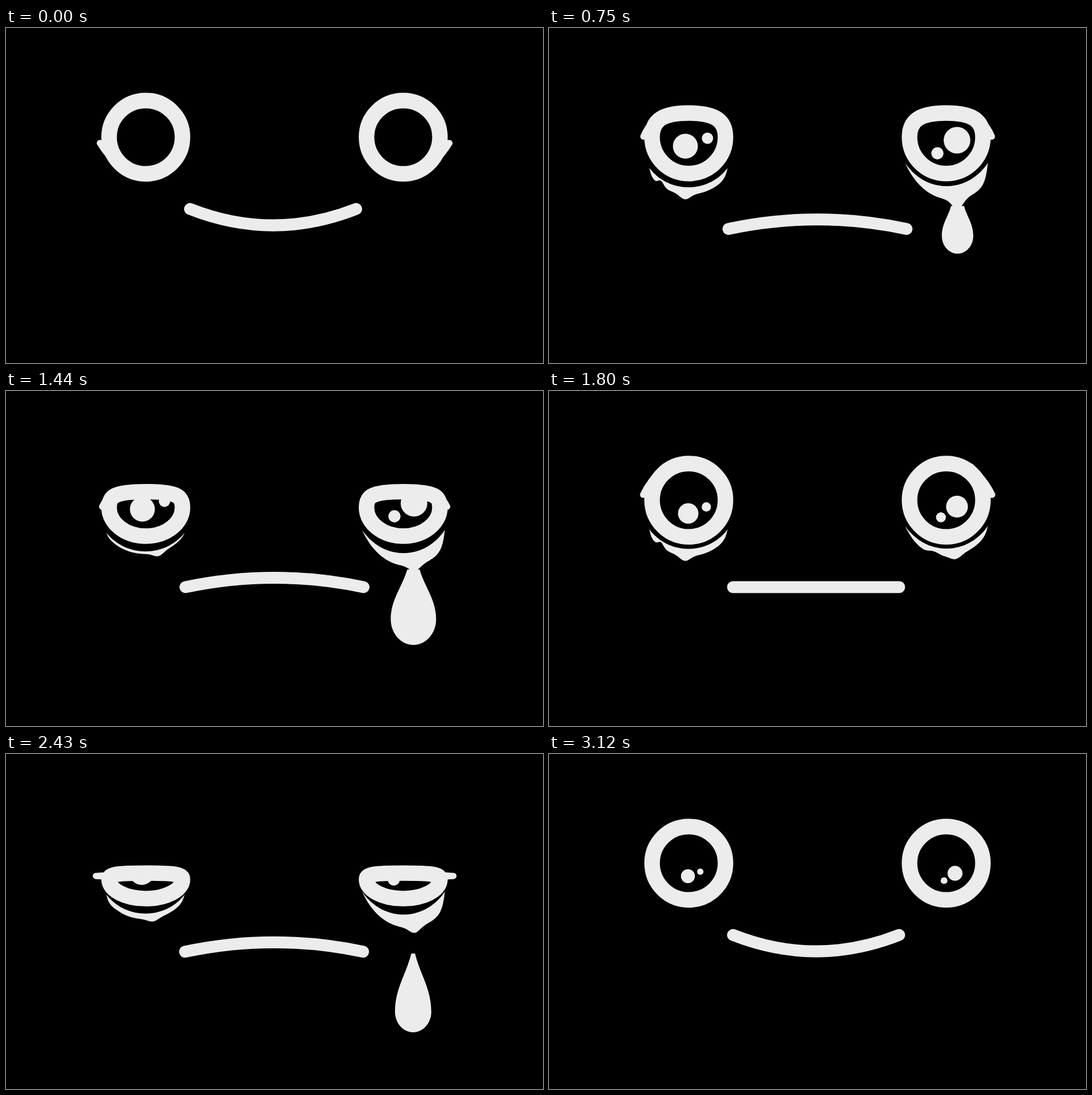
Write an HTML page that moves like this. It is 947 px wide and 591 px high and loops after 3390 ms.

```html
<!DOCTYPE html>
<html lang="en">
<head>
<meta charset="utf-8">
<title>Tearful face</title>
<style>
html, body { margin: 0; width: 100%; height: 100%; overflow: hidden; background: #000; }
svg { display: block; width: 100%; height: 100%; }
</style>
</head>
<body>
<svg viewBox="0 0 947 591" fill="#ececec">
  <defs>
    <clipPath id="clipL"><path id="holeL"/></clipPath>
    <clipPath id="clipR"><path id="holeR"/></clipPath>
  </defs>
  <path id="bagL"/><path id="bagR"/><path id="tear"/>
  <g stroke="#ececec" stroke-width="11" stroke-linejoin="round">
    <path id="browL"/><path id="browR"/>
  </g>
  <path id="fillL" fill="#000"/><path id="fillR" fill="#000"/>
  <g clip-path="url(#clipL)"><circle id="bigL"/><circle id="smallL"/></g>
  <g clip-path="url(#clipR)"><circle id="bigR"/><circle id="smallR"/></g>
  <g fill="none" stroke="#ececec" stroke-width="27.4">
    <path id="ringL"/><path id="ringR"/>
  </g>
  <path id="mouth" fill="none" stroke="#ececec" stroke-width="21" stroke-linecap="round"/>
</svg>
<script>
const LOOP = 3390, STEP = 30, MIRROR = 947.5;
const el = {};
document.querySelectorAll('[id]').forEach(n => el[n.id] = n);
const lerp = (a, b, u) => a + (b - a) * u;
const ease = u => u * u * (3 - 2 * u);
const bump = (u, at, width) => Math.exp(-(((u - at) / width) ** 2));

// Fixed traits of each eye: centre, bag ends and its tapers, glint radius and offset.
const sides = {
  L: { cx: 246.5, from: 177, to: 315, taper: [18, 14], notchAt: .17, notchWidth: .05, r: 22, glint: [39, -14] },
  R: { cx: 700.5, from: 628, to: 774, taper: [2.6, 14], notchAt: .36, notchWidth: .08, r: 23.5, glint: [-34.5, 23] }
};

// lid: 0 open to 1 shut          brow: tip, end
// look: size, big left, big right  mouth: left, right, y, bend
// bag: end y, lowest y of the upper edge, thickness left and right, drip, drip place, notch
// tear: x, neck y, half neck, half width, bottom
const neutral = {
  lid: [0],
  brow: [166, 183, 204, 133],
  look: [.82, 245.5, 216, 719.5, 204],
  mouth: [324.5, 617.5, 346, 346],
  bagL: [244, 278.5, 12, 13, 9, .46, 9],
  bagR: [238, 278, 15, 12, 7, .6, 6],
  tear: [718, 295, 7, 7, 297]
};
const sad = {
  ...neutral,
  look: [1, 237, 210, 716, 199],
  mouth: [314.5, 628, 354.5, 321],
  bagL: [244, 278.5, 20.5, 20, 2, .46, 2],
  bagR: [238, 278, 16, 30, 10, .62, 0],
  tear: [718, 504, 0, 0, 505]
};
const happy = {
  ...neutral,
  brow: [178, 185, 204, 140],
  look: [.56, 245, 215.5, 716, 210.5],
  mouth: [324.5, 617.5, 319.3, 377],
  bagL: [244, 278.5, 0, 0, 0, .46, 0],
  bagR: [238, 278, 0, 0, 0, .6, 0]
};
const smile = { ...happy, brow: [165.5, 203, 214, 257], look: [0, 246, 214, 712, 212] };
const welling = {
  ...neutral,
  lid: [.197],
  brow: [166.5, 191.5, 188, 160],
  look: [1, 240.5, 208.5, 719.5, 198],
  mouth: [316.5, 630.5, 354.5, 321],
  bagL: [247, 281, 12, 13, 9, .46, 9],
  bagR: [238, 279, 16, 30, 18, .62, 0],
  tear: [720.5, 314, 11.5, 27.7, 398]
};
const dripping = {
  ...welling,
  lid: [.443],
  brow: [169.5, 204, 187, 181],
  mouth: [316.5, 630.5, 346, 313],
  bagL: [250, 283, 5, 4, 7, .65, 0],
  bagR: [245, 286, 16, 28, 10, .62, 0],
  tear: [718.5, 315, 11, 40, 448]
};
const shut = { ...dripping, lid: [1], brow: [154.5, 227, 190, 240], tear: [718, 320, 5, 36, 484] };
const falling = { ...sad, lid: [.2], brow: welling.brow, tear: [718, 416, 0, 24, 505] };

const keys = [
  [0, smile], [330, smile], [600, neutral, ease],
  [750, welling], [810, dripping], [870, shut], [960, falling], [1050, sad],
  [1290, sad], [1440, dripping], [1530, shut], [1650, falling], [1800, neutral],
  [2130, neutral], [2280, welling], [2340, dripping], [2400, shut], [2490, falling], [2610, sad],
  [2940, sad], [3120, happy, ease], [LOOP, happy]
];

function poseAt(t) {
  const i = keys.findIndex(k => t < k[0]);
  const [t0, a] = keys[i - 1], [t1, b, curve] = keys[i];
  let u = (t - t0) / (t1 - t0);
  if (curve) u = curve(u);
  const pose = {};
  for (const name in a) pose[name] = a[name].map((v, j) => lerp(v, b[name][j], u));
  return pose;
}

// A circle whose top is pressed down by the lid.
function ringPath(cx, lid) {
  const l = cx - 64.7, r = cx + 64.7;
  const top = 128 + 112 * lid, low = 257.3 - 3 * lid;
  const mid = 192.6 + 54 * Math.max(0, lid - .2);
  const flat = 35.7 + 21 * Math.sin(Math.PI * lid);
  const up = 35.7 * (1 - lid), down = (low - mid) * .552;
  return `M${l},${mid}C${l},${mid - up} ${cx - flat},${top} ${cx},${top}` +
    `S${r},${mid - up} ${r},${mid}` +
    `C${r},${mid + down} ${cx + 35.7},${low} ${cx},${low}` +
    `S${l},${mid + down} ${l},${mid}Z`;
}

function browPath([x, y, ex, ey], mirror) {
  const m = v => mirror ? MIRROR - v : v;
  const bend = .15 * Math.abs(ey - y);
  return `M${m(x)},${y}Q${m((x + ex) / 2 - bend)},${(y + ey) / 2} ${m(ex)},${ey}L${m(x + 19)},${y + 1}Z`;
}

// Upper edge is an arc; the lower one hangs below it by a thickness with a drip and a notch.
function bagPath({ from, to, taper, notchAt, notchWidth }, [y, low, left, right, drip, dripAt, notch]) {
  const upper = [], lower = [], n = 64;
  for (let i = 0; i <= n; i++) {
    const u = i / n, side = 3 * u * (1 - u);
    const x = lerp(from, to, side * (.25 + .5 * u) + u ** 3);
    const arc = y + (low - y) * 4 * u * (1 - u);
    const edge = 1 - Math.abs(2 * u - 1) ** taper[u < .5 ? 0 : 1];
    const thick = lerp(left, right, ease(u)) + drip * bump(u, dripAt, .08) -
      notch * bump(u, notchAt, notchWidth);
    upper.push([x, arc]);
    lower.unshift([x, arc + edge * thick]);
  }
  return 'M' + upper.concat(lower).join('L') + 'Z';
}

function tearPath([x, y, neck, half, low]) {
  const wide = low - 1.13 * half, round = .55 * half;
  const shoulder = lerp(neck, half, .3), a = lerp(y, wide, .35), b = lerp(wide, y, .4);
  return `M${x - neck},${y}C${x - shoulder},${a} ${x - half},${b} ${x - half},${wide}` +
    `C${x - half},${wide + round * 1.13} ${x - round},${low} ${x},${low}` +
    `S${x + half},${wide + round * 1.13} ${x + half},${wide}` +
    `C${x + half},${b} ${x + shoulder},${a} ${x + neck},${y}Z`;
}

const put = (id, d) => el[id].setAttribute('d', d);

function dot(id, x, y, r) {
  el[id].setAttribute('cx', x);
  el[id].setAttribute('cy', y);
  el[id].setAttribute('r', r);
}

function draw(t) {
  const p = poseAt(t);
  const [size, lx, ly, rx, ry] = p.look;
  for (const [key, x, y] of [['L', lx, ly], ['R', rx, ry]]) {
    const side = sides[key], r = side.r * size;
    const ring = ringPath(side.cx, p.lid[0]);
    for (const part of ['hole', 'fill', 'ring']) put(part + key, ring);
    put('brow' + key, browPath(p.brow, key === 'R'));
    put('bag' + key, bagPath(side, p['bag' + key]));
    dot('big' + key, x, y, r);
    dot('small' + key, x + side.glint[0] * size, y + side.glint[1] * size, r * .455);
  }
  put('tear', p.tear[4] - p.tear[1] > 3 ? tearPath(p.tear) : '');
  const [l, r, y, bend] = p.mouth;
  put('mouth', `M${l},${y}Q${(l + r) / 2},${bend} ${r},${y}`);
}

const start = performance.now();
function tick() {
  const t = (performance.now() - start) % LOOP;
  draw(Math.floor(t / STEP) * STEP);
  requestAnimationFrame(tick);
}
tick();
</script>
</body>
</html>
```
